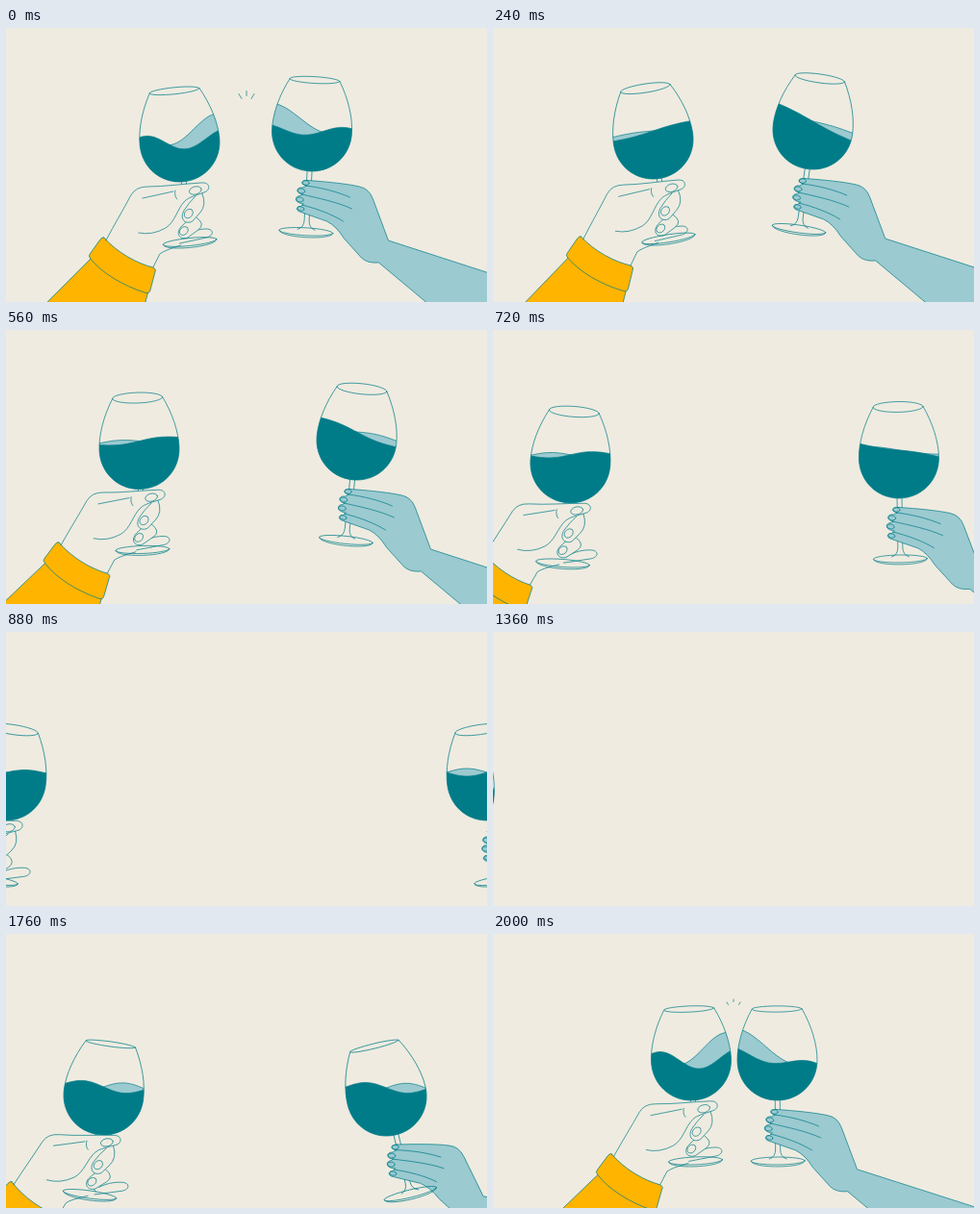
An HTML page with a canvas for the animation above (2.08 s loop, 500 by 285 pixels).

```html
<!DOCTYPE html>
<html lang="en">
<head>
<meta charset="utf-8">
<title>Cheers</title>
<style>
html, body { margin: 0; width: 100%; height: 100%; overflow: hidden; background: #efebe0; }
canvas { display: block; width: 500px; height: 285px; }
</style>
</head>
<body>
<canvas id="stage"></canvas>
<script>
const LOOP = 2080, STEP = 80, CLINK = 2040;
const PAPER = '#efebe0', TEAL = '#007c88', PALE = '#9bcad0', YELLOW = '#ffb400';
const FOOT = 105;
const canvas = document.getElementById('stage');
const ctx = canvas.getContext('2d');
const dpr = window.devicePixelRatio || 1;
canvas.width = 500 * dpr;
canvas.height = 285 * dpr;

// Cyclic, monotone cubic easing through key poses; the first column is the time
function track(keys) {
  const n = keys.length;
  const key = i => keys[(i + n) % n];
  const time = i => key(i)[0] + LOOP * Math.floor(i / n);
  const slope = (i, c) => (key(i + 1)[c] - key(i)[c]) / (time(i + 1) - time(i));
  const tangent = (i, c) => {
    const a = slope(i - 1, c), b = slope(i, c);
    return a * b > 0 ? 2 * a * b / (a + b) : 0;
  };
  return t => {
    let i = n - 1;
    while (time(i) > t) i--;
    const h = time(i + 1) - time(i), u = (t - time(i)) / h;
    return key(i).map((v, c) => v + (key(i + 1)[c] - v) * u * u * (3 - 2 * u)
      + h * u * (1 - u) * (tangent(i, c) * (1 - u) - tangent(i + 1, c) * u));
  };
}

// Keys: time, bowl x, bowl y, glass tilt, liquid lean, liquid roll
const left = {
  pose: track([
    [0, 180.5, 118, -5.8, -4, 4],
    [240, 166.5, 115, -8.7, -11, -1],
    [560, 138.5, 123.5, -1.9, -4, -2],
    [880, 0, 154, 8.4, 1, -3],
    [1120, -100, 166, 8.4, 2, 0],
    [1360, -40.5, 169, 8, 3, 3],
    [1760, 101.5, 167, 7.9, 3, 5],
    [2000, 206, 131, -2.5, -2, 6]
  ]),
  swing: -12, crest: 8,
  grip: [25, 46], pivot: [211, 162],
  wrist: tilt => 2 + 0.35 * tilt,
  hand: leftHand
};
const right = {
  pose: track([
    [0, 318, 107, 3.3, 2, -3],
    [240, 332.5, 105, 7.9, 21, 1],
    [560, 364.5, 114, 6, 16, 2],
    [880, 500, 154, -8, 0, -4],
    [1120, 600, 166, -10, 0, 0],
    [1360, 545, 170, -13, 1, 4],
    [1760, 395.5, 168, -13.7, 1, 5],
    [2000, 295.5, 131, -0.4, 8, -3]
  ]),
  swing: 17, crest: 4,
  grip: [-6.5, 54], pivot: [309, 161],
  wrist: tilt => 0.42 * Math.min(0, tilt),
  hand: rightHand
};

const bowl = new Path2D('M-26,-53C-36,-35 -41.5,-16 -41.5,0C-41.5,24 -23,42 0,42C23,42 41.5,24 41.5,0C41.5,-16 36,-35 26,-53');

function paint(path, fill, line = TEAL, width = 0.7) {
  const p = typeof path === 'string' ? new Path2D(path) : path;
  if (fill) { ctx.fillStyle = fill; ctx.fill(p); }
  if (line) { ctx.strokeStyle = line; ctx.lineWidth = width; ctx.stroke(p); }
}

function oval(x, y, rx, ry, tilt = 0) {
  const p = new Path2D();
  p.ellipse(x, y, rx, ry, tilt * Math.PI / 180, 0, 7);
  paint(p);
}

function within(x, y, tilt, draw) {
  ctx.save();
  ctx.translate(x, y);
  ctx.rotate(tilt * Math.PI / 180);
  draw();
  ctx.restore();
}

// A leaning surface with one rolling wave and one standing wave
function liquid(fill, level, lean, roll, crest) {
  const p = new Path2D();
  p.moveTo(-60, 60);
  for (let x = -45; x <= 45; x += 3) {
    const u = x / 42, a = Math.PI * u;
    p.lineTo(x, level + lean * u + roll * Math.sin(a) + crest * Math.cos(a));
  }
  p.lineTo(60, 60);
  paint(p, fill);
}

function leftHand(shift) {
  // Sleeve
  paint('M89,237L0,326L130,340L148,272Z', YELLOW);
  // Palm
  paint('M104,219C113,202 122,187 130,172Q135,163 147,163C165,163 185,160 203,159C213,158 213,167 206,169L203,172Q207,181 201,188Q206,198 200,205L190,212L182,224Q165,229 160,233L152,247Q120,240 104,219Z', PAPER, null);
  paint('M182,224Q165,229 160,233L153,247');
  // Cuff
  paint('M102,216C116,232 137,243 153,247Q157,249 155,252L150,271Q149,275 144,273C122,266 100,253 88,238Q85,235 88,232L98,218Q100,215 102,216Z', YELLOW);
  // Fingers, from the lowest up
  within(shift, 0, 0, () => paint('M188,214C198,208 207,207 212,207C220,207 220,214 212,216L184,222', PAPER));
  paint('M198,195Q208,202 200,208L189,216C181,219 176,212 182,205L188,199', PAPER);
  oval(185, 209, 5, 3.8, -45);
  paint('M204,170Q209,182 202,190L194,199C187,203 180,197 185,188Q190,180 197,173', PAPER);
  oval(190, 191, 5.2, 4, -50);
  // Thumb and back of the hand
  paint('M104,219C113,202 122,187 130,172Q135,163 147,163C165,163 185,160 203,159C213,158 213,167 206,169C198,172 190,174 186,178C178,186 176,200 166,206Q152,214 138,211');
  oval(197, 167, 6.5, 4, -16);
  paint('M142,175L174,168M176,167Q175,173 178,176');
}

function rightHand() {
  paint('M314,158.5C335,160 355,162 368,165Q378,167 382,178L398,221L520,260.5L520,345L507,340L437,285L388,244Q376,245 370,239L352,219Q344,206 334,201L307,191.5C301,190 302,185 307,185.5L310,183C300,182 300,175 306,174.5L309,173C301,172 302,165 309,166L313,164C306,163 308,158 314,158.5Z', PALE);
  paint('M312,164C328,166 344,170 358,176M308,173C325,177 345,181 360,188M308,184C324,188 340,194 351,201');
  oval(312, 161, 3.8, 2.3, 8);
  oval(307.5, 169.5, 3.8, 2.5, 10);
  oval(306, 178.5, 3.8, 2.5, 10);
  oval(307, 188, 3.6, 2.2, 14);
}

function drawSide(side, t) {
  const [, x, y, tilt, lean, roll] = side.pose(t);
  const away = (t + LOOP / 2 - CLINK + LOOP) % LOOP - LOOP / 2;
  const splash = Math.abs(away) < 240 ? Math.cos(Math.PI * away / 480) : 0;
  const rim = 4 + 1.5 * Math.cos(2 * Math.PI * (t - 640) / LOOP);

  within(x, y, tilt, () => {
    for (const s of [-1, 1]) {
      paint(`M${2.5 * s},42V${FOOT - 12}Q${2.5 * s},${FOOT - 4} ${9 * s},${FOOT - 2}`);
    }
    ctx.save();
    ctx.clip(bowl);
    ctx.rotate(-tilt * Math.PI / 180);
    liquid(PALE, -8, 0.6 * lean + side.swing * splash, -roll, side.crest * splash);
    liquid(TEAL, -8 + 8 * splash, lean, roll, side.crest * splash);
    ctx.restore();
    paint(bowl);
    oval(0, -53, 26, rim);
  });

  const [gx, gy] = side.grip, [px, py] = side.pivot;
  within(x + gx - 0.92 * tilt, y + gy, side.wrist(tilt), () => {
    ctx.translate(-px, -py);
    side.hand(0.6 * tilt);
  });

  within(x, y, tilt, () => {
    oval(0, FOOT, 28, 4);
    paint(`M-28,${FOOT}C-28,${FOOT + 8} 28,${FOOT + 8} 28,${FOOT}`);
  });
}

// Three short strokes that fly up and outwards after the clink
function sparks(t) {
  const age = (t - 2000 + LOOP) % LOOP / STEP;
  if (age > 2) return;
  const size = age === 1 ? 5 : 2.5, y = 71 - 2.5 * age;
  for (const s of [-1, 0, 1]) {
    const x = 250 + s * (7 + age);
    paint(`M${x},${y - (s ? 0 : 3)}l${-s * size * 0.6},${size}`);
  }
}

function frame(now) {
  const t = Math.floor(now % LOOP / STEP) * STEP;
  ctx.setTransform(dpr, 0, 0, dpr, 0, 0);
  ctx.lineCap = ctx.lineJoin = 'round';
  ctx.fillStyle = PAPER;
  ctx.fillRect(0, 0, 500, 285);
  drawSide(left, t);
  drawSide(right, t);
  sparks(t);
}

const start = performance.now();
function tick() {
  frame(performance.now() - start);
  requestAnimationFrame(tick);
}
tick();
</script>
</body>
</html>
```
